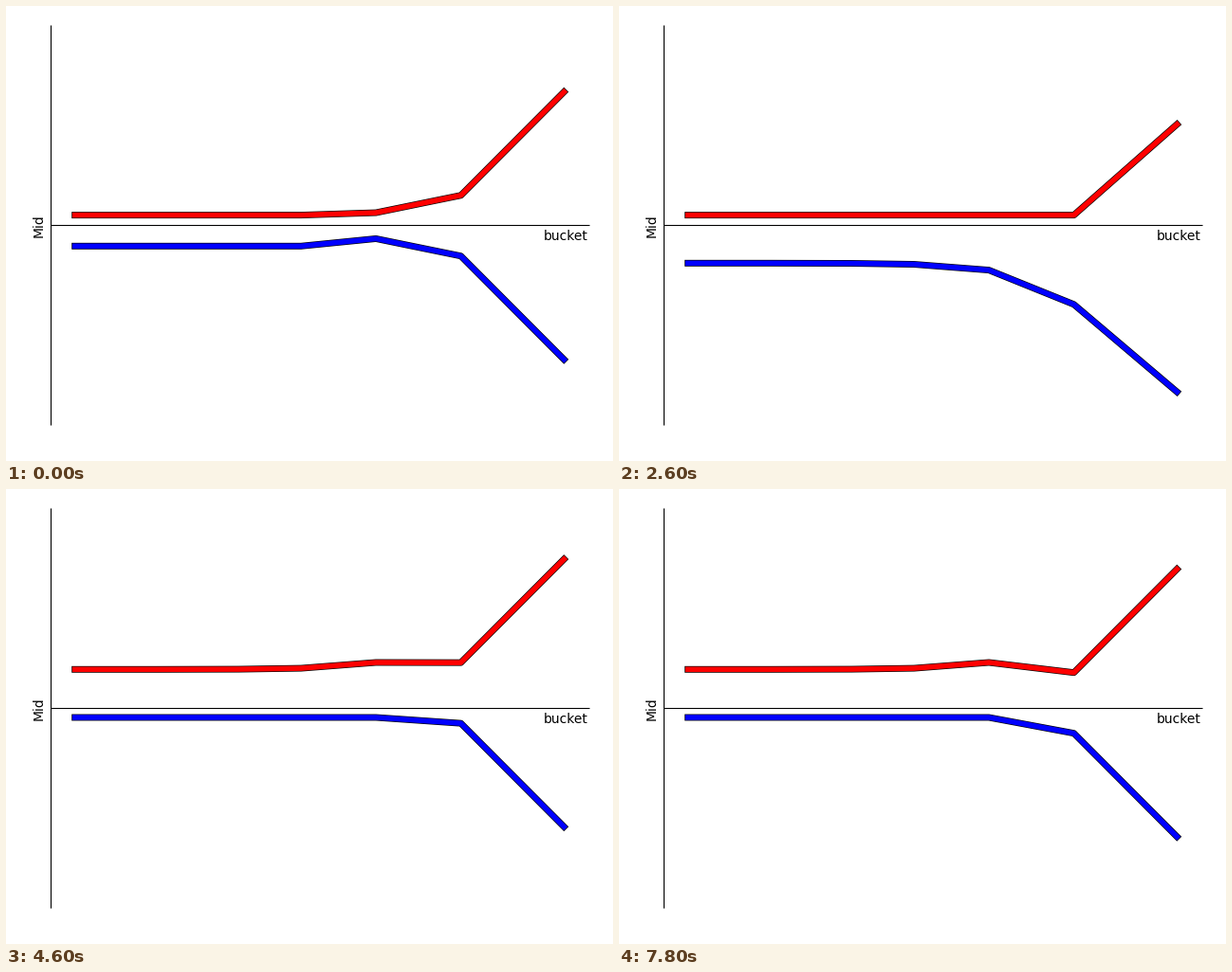
Write a matplotlib script that moves like this. It is 640x480 px and loops after 8000 ms.

```python
import numpy as np
import matplotlib.pyplot as plt
import matplotlib.patheffects as pe
from matplotlib.animation import FuncAnimation

W, H, DPI = 640, 480, 100
FRAMES, INTERVAL = 40, 200
ZERO = 230.8       # y of the unskewed mid price
TOUCH = 10.2       # closest a quote may come to ZERO
SOFT = 5.0         # skew below which the passive side is only partly widened

BUCKET_X = np.array([72.7, 160, 245, 311, 390, 479.6, 588.3])
HALF_SPREAD = np.array([5.5, 5.6, 5.8, 6.5, 13.7, 32, 141.1])
WIDE = np.array([40.5, 40.5, 40.7, 41.7, 47.8, 84, 200])

plt.rcParams["font.family"] = "DejaVu Sans"
fig = plt.figure(figsize=(W / DPI, H / DPI), dpi=DPI, facecolor="white")
ax = fig.add_axes([0, 0, 1, 1])
ax.set_xlim(0, W)
ax.set_ylim(H, 0)
ax.axis("off")

ax.plot([47, 47], [20, 442], color="black", lw=0.8, solid_capstyle="butt")
ax.plot([47, 615], [231, 231], color="black", lw=0.8, solid_capstyle="butt")
ax.text(614, 247, "bucket", ha="right", va="baseline", fontsize=10)
ax.text(39, 231.5, "Mid", ha="center", va="baseline", fontsize=10,
        rotation=90, rotation_mode="anchor")


def quote_line(color):
    outline = [pe.Stroke(linewidth=5, foreground="black"), pe.Normal()]
    return ax.plot([], [], color=color, lw=4, solid_capstyle="projecting",
                   solid_joinstyle="round", path_effects=outline)[0]


ask = quote_line("red")
bid = quote_line("blue")


def skew(frame):
    """Triangle wave of the mid price, in pixels below ZERO."""
    return np.interp(frame, [0, 10, 30, 40], [0.95, 50.4, -51.2, 0])


def quotes(m):
    """Distances of the aggressive and the passive side for a skew m >= 0."""
    near = HALF_SPREAD - m
    far = HALF_SPREAD + m
    capped = near < TOUCH
    wide = WIDE if m >= SOFT else np.full_like(WIDE, 20.5 + 2.1 * m)
    return np.maximum(near, TOUCH), np.where(capped, wide, far)


def update(frame):
    m = skew(frame)
    near, far = quotes(abs(m))
    up, down = (near, far) if m >= 0 else (far, near)
    ask.set_data(BUCKET_X, ZERO - up)
    bid.set_data(BUCKET_X, ZERO + down)
    return ask, bid


anim = FuncAnimation(fig, update, frames=FRAMES, interval=INTERVAL,
                     repeat=True, repeat_delay=0)
plt.show()
```
